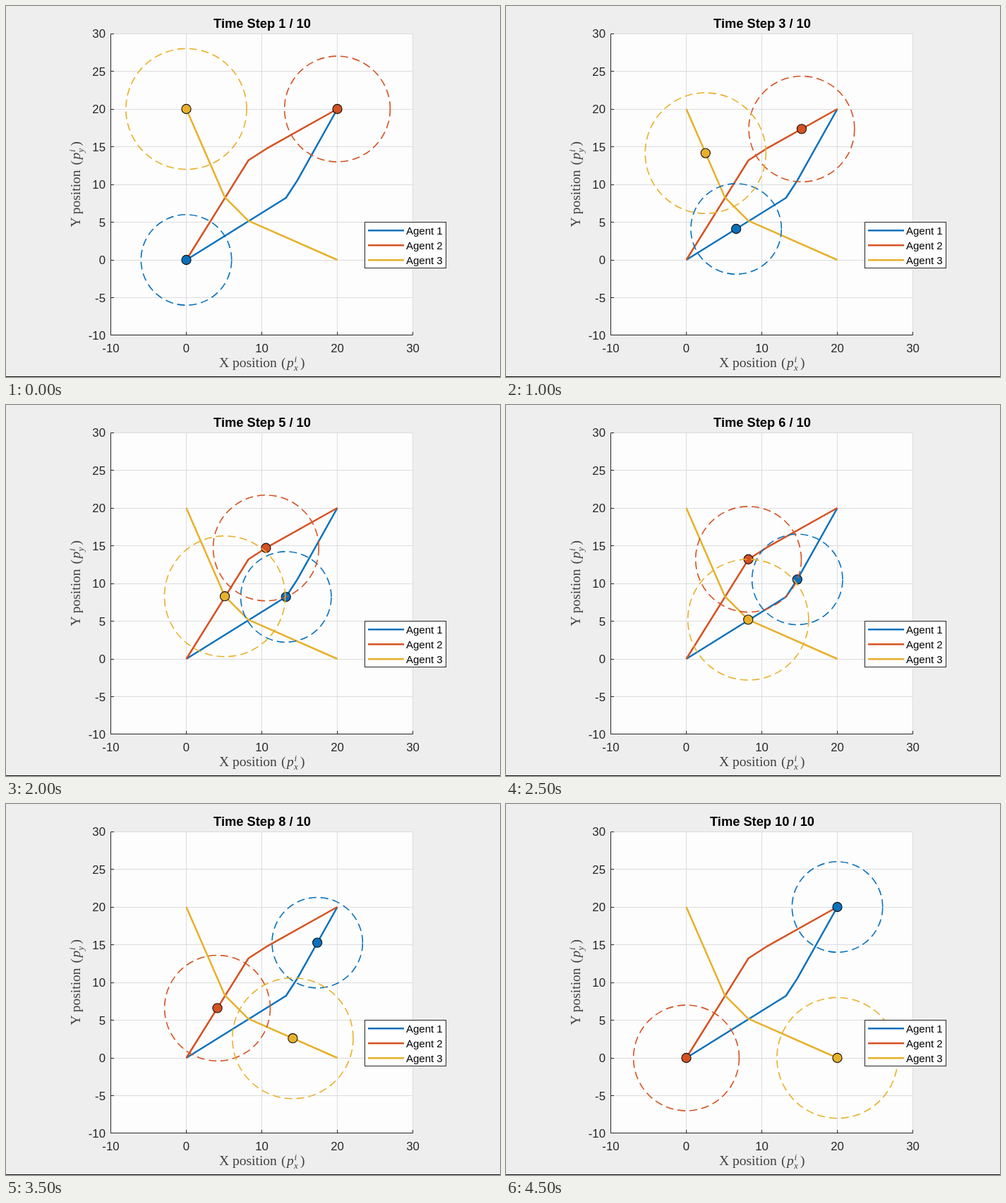
Write an HTML page that moves like this. It is 700 px wide and 526 px high and loops after 5000 ms.

```html
<!DOCTYPE html>
<html lang="en">
<head>
<meta charset="utf-8">
<title>Agent trajectories</title>
<style>
  html, body { margin: 0; width: 100%; height: 100%; overflow: hidden; background: #eee; }
  svg { display: block; width: 100%; height: 100%; }
  text { font-family: "Liberation Sans", Arial, sans-serif; fill: #262626; }
  .title { font-size: 18.3px; font-weight: bold; text-anchor: middle; fill: #000; }
  .tick { font-size: 16.8px; }
  .entry { font-size: 15px; fill: #000; }
  .label text { font-family: "Liberation Serif", "Times New Roman", serif; font-size: 19.5px; fill: #404040; }
  .label .var { font-style: italic; }
  .label .small { font-style: italic; font-size: 13px; }
  .grid { stroke: #dcdce0; }
  .axis { stroke: #262626; fill: none; }
  .path { fill: none; stroke-width: 2.5; stroke-linejoin: round; }
  .range { fill: none; stroke-width: 1.6; stroke-dasharray: 11 6; }
  .marker { stroke: #111; stroke-width: 1.1; }
</style>
</head>
<body>
<svg id="stage" viewBox="0 0 700 526">
  <rect width="700" height="526" fill="#eee"/>
  <rect y="525" width="700" height="1" fill="#111"/>
  <rect x="148.5" y="39.5" width="428" height="427.5" fill="#fdfdfd"/>
</svg>
<script>
const NS = "http://www.w3.org/2000/svg";
const stage = document.getElementById("stage");
const STEP_MS = 500, STEPS = 10, UNIT = 10.7;
const px = x => 255.5 + UNIT * x;
const py = y => 360 - UNIT * y;

// Each route: start, two turns, goal
const agents = [
  { color: "#0a71bc", range: 6, route: [[0, 0], [13.2, 8.22], [14.7, 10.53], [20, 20]] },
  { color: "#d55222", range: 7, route: [[20, 20], [10.55, 14.7], [8.23, 13.2], [0, 0]] },
  { color: "#e8b02a", range: 8, route: [[0, 20], [5.1, 8.3], [8.2, 5.2], [20, 0]] }
];

// Four even steps to the first turn, one to the second, four to the goal
function positionAt([start, turn1, turn2, goal], step) {
  const mix = (a, b, t) => a.map((v, i) => v + (b[i] - v) * t);
  return step <= 4 ? mix(start, turn1, step / 4) : mix(turn2, goal, (step - 5) / 4);
}

function add(tag, attrs, parent = stage, text = "") {
  const node = document.createElementNS(NS, tag);
  for (const key in attrs) node.setAttribute(key, attrs[key]);
  node.textContent = text;
  parent.appendChild(node);
  return node;
}

function addLine(x1, y1, x2, y2, attrs) {
  return add("line", { x1, y1, x2, y2, ...attrs });
}

function addLabel(name, transform) {
  const group = add("g", { class: "label", transform });
  const put = (x, y, text, cls = "") => add("text", { x, y, class: cls }, group, text);
  put(0, 0, name.toUpperCase() + " position");
  put(88, 0, "(");
  put(96, 0, "p", "var");
  put(106.5, -7, "i", "small");
  put(106, 5, name, "small");
  put(115, 0, ")");
}

// Grid and axes
const LEFT = 148.5, RIGHT = 576.5, TOP = 39.5, BOTTOM = 466.5;
const rowOf = y => Math.min(Math.floor(py(y)) + 0.5, BOTTOM);
for (let x = 0; x <= 30; x += 10) addLine(px(x), TOP, px(x), BOTTOM, { class: "grid" });
for (let y = -5; y <= 30; y += 5) addLine(LEFT, rowOf(y), RIGHT, rowOf(y), { class: "grid" });
add("path", { class: "axis", d: `M${LEFT} ${TOP}V${BOTTOM}H${RIGHT}` });
for (let x = -10; x <= 30; x += 10) {
  addLine(px(x), BOTTOM, px(x), BOTTOM - 4.5, { class: "axis" });
  add("text", { class: "tick", x: px(x), y: 491, "text-anchor": "middle" }, stage, x);
}
for (let y = -10; y <= 30; y += 5) {
  addLine(LEFT, rowOf(y), LEFT + 4.5, rowOf(y), { class: "axis" });
  add("text", { class: "tick", x: 141, y: py(y) + 6, "text-anchor": "end" }, stage, y);
}
const title = add("text", { class: "title", x: 363, y: 31 });
addLabel("x", "translate(302 511.5)");
addLabel("y", "translate(105 313.5) rotate(-90)");

// Trajectories, then moving markers with their ranges
for (const { color, route } of agents) {
  const points = route.map(([x, y]) => `${px(x)},${py(y)}`).join(" ");
  add("polyline", { class: "path", stroke: color, points });
}
for (const agent of agents) {
  const r = agent.range * UNIT;
  agent.group = add("g", {});
  add("circle", { class: "marker", r: 6.6, fill: agent.color }, agent.group);
  add("path", {
    class: "range", stroke: agent.color,
    d: `M${r} 0A${r} ${r} 0 0 0 ${-r} 0A${r} ${r} 0 0 0 ${r} 0`
  }, agent.group);
}

// Legend
add("rect", { x: 508.5, y: 306.5, width: 115, height: 65, fill: "#fff", stroke: "#262626" });
agents.forEach(({ color }, i) => {
  const y = 318.2 + 21 * i;
  addLine(513, y, 564, y, { stroke: color, "stroke-width": 2.5 });
  add("text", { class: "entry", x: 567, y: y + 5.8 }, stage, `Agent ${i + 1}`);
});

let shown = -1;
function show(step) {
  if (step === shown) return;
  shown = step;
  title.textContent = `Time Step ${step + 1} / ${STEPS}`;
  for (const { group, route } of agents) {
    const [x, y] = positionAt(route, step);
    group.setAttribute("transform", `translate(${px(x)} ${py(y)})`);
  }
}

const start = performance.now();
function tick() {
  show(Math.floor((performance.now() - start) / STEP_MS) % STEPS);
  requestAnimationFrame(tick);
}
show(0);
requestAnimationFrame(tick);
</script>
</body>
</html>
```
